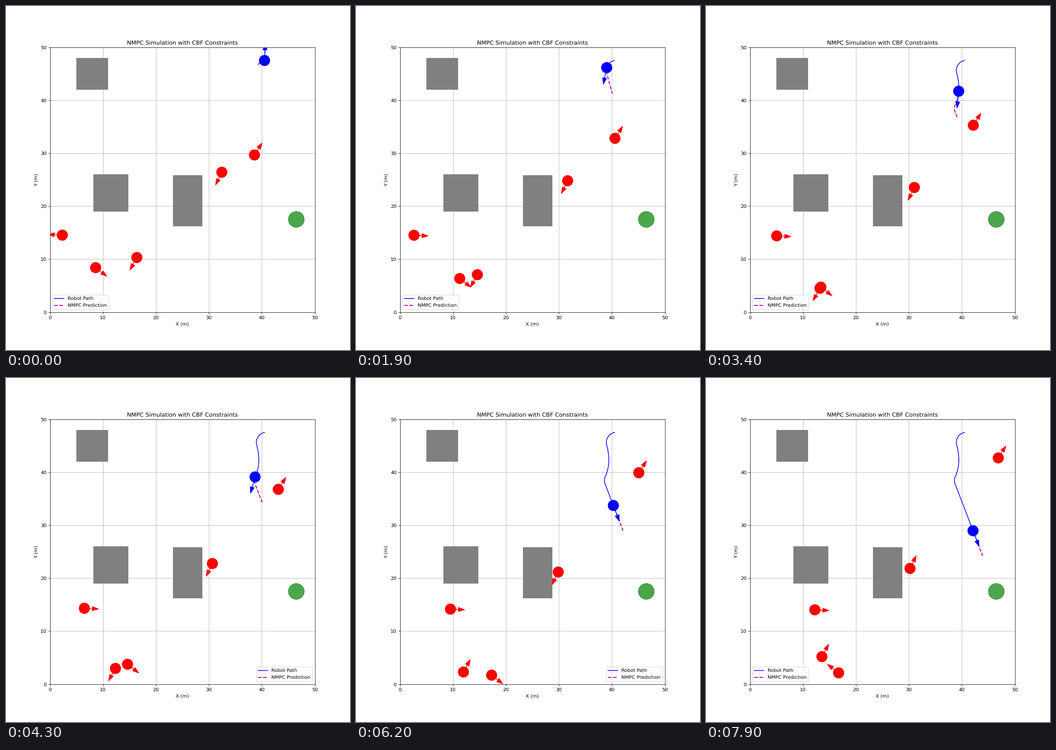
Recreate the animation shown at these times as a matplotlib script. Size 748x748 px, loop 8000 ms.

```python
import numpy as np
import matplotlib.pyplot as plt
from matplotlib.animation import FuncAnimation
from matplotlib.patches import Circle, Rectangle

plt.rcParams["text.hinting"] = "none"

SIZE, DPI = 748, 74.8
FRAMES = 80
HORIZON = 18
STEP = 0.3                  # metres per frame at full speed
TURN = 9.0                  # largest turn per frame, degrees
START_MOVING = 12
SWERVE = (22, 42)           # steps spent giving way to the passing disc
GAP = 0.95                  # clearance at which a red disc turns back

START, GOAL = np.array([40.5, 47.5]), np.array([46.5, 17.5])
BLOCKS = [(5, 42, 6, 6), (8.2, 19, 6.6, 7), (23.25, 16.2, 5.5, 9.6)]
# position and velocity per frame
MOVERS = [
    ((38.60, 29.67), (0.1047, 0.1650)),
    ((32.44, 26.41), (-0.0413, -0.0847)),
    ((2.33, 14.53), (-0.1600, 0.0081)),
    ((16.40, 10.31), (-0.0940, -0.1707)),
    ((8.62, 8.40), (0.1400, -0.1082)),
]


def heading(angle):
    """Unit vector for an angle from straight down, positive to the right."""
    a = np.radians(angle)
    return np.array([np.sin(a), -np.cos(a)])


def steer(pos, angle, k, avoid):
    begin, end = SWERVE
    if avoid and begin < k <= end:
        return 14.5 - 39 * ((k - begin) / (end - begin)) ** 1.3
    dx, dy = GOAL - pos
    bearing = np.degrees(np.arctan2(dx, -dy))
    return angle + np.clip(bearing - angle, -TURN, TURN)


def drive(pos, angle, first, last, avoid):
    """Positions and angles of the robot from step first to step last."""
    points, turns = [pos], [angle]
    for k in range(first, last):
        if k >= START_MOVING:
            pos = pos + STEP * heading(angle)
        angle = steer(pos, angle, k + 1, avoid)
        points.append(pos)
        turns.append(angle)
    return np.array(points), np.array(turns)


track, angles = drive(START, -182.5, 0, FRAMES + HORIZON, True)


def prediction(k):
    """Plan made one step ago: first straight to the goal, later around the disc."""
    first, last = max(k - 1, 0), k - 1 + HORIZON
    direct, _ = drive(track[first], angles[first], first, last, False)
    w = np.clip((k - SWERVE[0]) / 8, 0, 1)
    return (1 - w) * direct + w * track[first:last + 1]


def blocked(pos):
    if pos.min() < GAP or pos.max() > 50 - GAP:
        return True
    return any(np.hypot(*(pos - np.clip(pos, (x, y), (x + w, y + h)))) < GAP
               for x, y, w, h in BLOCKS)


def bounce(pos, vel):
    """Position and velocity per frame; turning back costs one step."""
    pos, vel = np.array(pos), np.array(vel)
    states = []
    for _ in range(FRAMES):
        states.append((pos, vel))
        if blocked(pos + vel):
            vel = -vel
        else:
            pos = pos + vel
    return states


class Agent:
    def __init__(self, color, length):
        self.length = length
        self.disc = ax.add_patch(Circle((0, 0), 1, color=color, zorder=3))
        self.arrow = ax.arrow(0, 0, 1, 0, head_width=0.8, head_length=1.2,
                              color=color, zorder=3)

    def place(self, pos, direction):
        dx, dy = self.length * direction / np.hypot(*direction)
        self.disc.center = tuple(pos)
        self.arrow.set_data(x=pos[0], y=pos[1], dx=dx, dy=dy)


fig = plt.figure(figsize=(SIZE / DPI, SIZE / DPI), dpi=DPI)
ax = fig.add_axes([0.1278, 0.1101, 0.77, 0.77])
ax.set(xlim=(0, 50), ylim=(0, 50), xlabel="X (m)", ylabel="Y (m)",
       title="NMPC Simulation with CBF Constraints")
ax.grid(True)

for x, y, w, h in BLOCKS:
    ax.add_patch(Rectangle((x, y), w, h, color="gray", lw=0, zorder=2))
ax.add_patch(Circle(GOAL, 1.5, color="green", alpha=0.7, zorder=2))

path_line, = ax.plot([], [], "b-", label="Robot Path")
plan_line, = ax.plot([], [], "m--", lw=2, label="NMPC Prediction")
legend = ax.legend(loc="lower left")

movers = [(Agent("red", 1.5), bounce(*m)) for m in MOVERS]
robot = Agent("blue", 2.0)


def update(k):
    for agent, states in movers:
        agent.place(*states[k])
    robot.place(track[k], heading(angles[k]))
    path_line.set_data(*track[:k + 1].T)
    plan_line.set_data(*prediction(k).T)
    # the legend keeps clear of the disc in the lower left corner
    legend.set_loc("lower right" if 43 <= k < 63 else "lower left")
    return []


anim = FuncAnimation(fig, update, frames=FRAMES, interval=100,
                     repeat=True, repeat_delay=0, blit=False)
plt.show()
```
